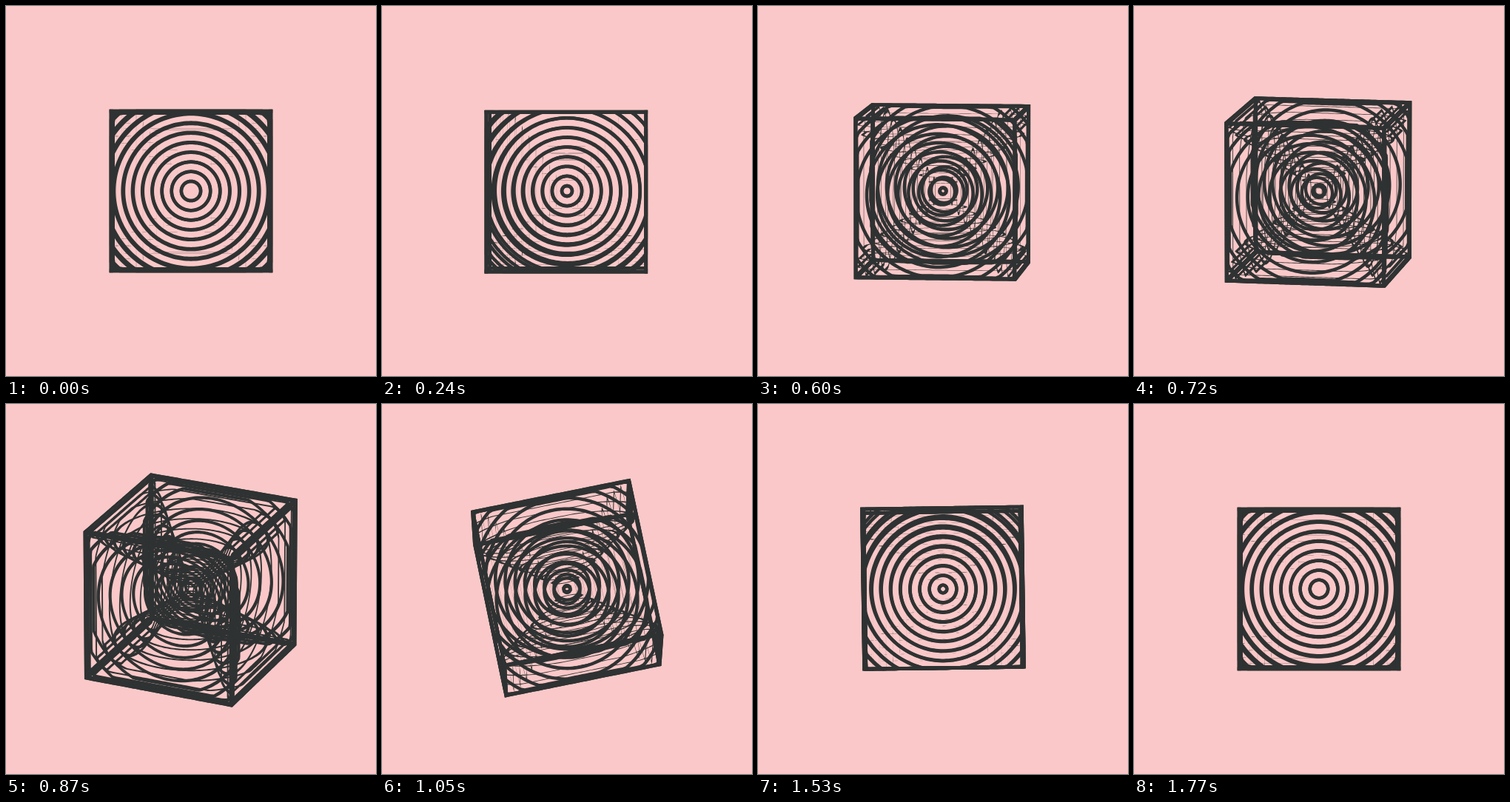
Animation of 500 by 500 pixels, one loop 1.8 s. Source, as an HTML page with a canvas:

```html
<!DOCTYPE html>
<html lang="en">
<head>
<meta charset="utf-8">
<title>Ringed cube</title>
<style>
  html, body { margin: 0; width: 100%; height: 100%; overflow: hidden; background: #fac8c8; }
  canvas { display: block; width: 500px; height: 500px; }
</style>
</head>
<body>
<canvas id="stage" width="500" height="500"></canvas>
<script>
const ctx = document.getElementById('stage').getContext('2d');
const LOOP = 1800, STEP = 30, RING_TIME = 450;
const HALF = 109, LINE = 4.5;  // cube half size and line width
const GAP = 13.1;              // ring spacing
const EYE = 9000, POINTS = 192;

// Closed form of cubic-bezier(1, 0, 0, 1)
function ease(x) {
  const s = 0.5 + Math.cbrt((x - 0.5) / 4);
  return s * s * (3 - 2 * s);
}

// Projected cube axes: screen x, screen y, nearness
function axesAt(angle) {
  const c = Math.cos(angle), s = Math.sin(angle);
  return [[c, s * s, c * s], [0, c, -s], [s, -s * c, -c * c]];
}

// Returns a projector for the plane at distance d along axis n
function plane(axes, n, d) {
  const w = axes[n], u = axes[(n + 1) % 3], v = axes[(n + 2) % 3];
  return (a, b) => {
    const p = i => u[i] * a + v[i] * b + w[i] * d;
    const scale = EYE / (EYE - p(2));
    return [250 + p(0) * scale, 250 + p(1) * scale];
  };
}

// Outline of a circle of radius r, flattened where it meets a square of half size h
function addOutline(project, r, h) {
  for (let i = 0; i < POINTS; i++) {
    const a = i / POINTS * Math.PI * 2, c = Math.cos(a), s = Math.sin(a);
    const reach = Math.min(r, h / Math.max(Math.abs(c), Math.abs(s)));
    const [x, y] = project(reach * c, reach * s);
    if (i) ctx.lineTo(x, y); else ctx.moveTo(x, y);
  }
  ctx.closePath();
}

function ring(project, r) {
  ctx.beginPath();
  addOutline(project, r + LINE / 2, HALF);
  if (r > LINE / 2) addOutline(project, r - LINE / 2, HALF - LINE);
  ctx.fill('evenodd');
}

function draw(t) {
  const axes = axesAt(ease(t / LOOP) * Math.PI / 2);
  const phase = t / RING_TIME % 1;
  ctx.fillStyle = '#fac8c8';
  ctx.fillRect(0, 0, 500, 500);
  ctx.fillStyle = '#2f3232';
  for (let n = 0; n < 3; n++) {
    for (const side of [-1, 1]) {
      for (let k = 0; k < 12; k++) {
        const r = (k + phase) * GAP, depth = r / Math.SQRT2;
        if (r > 0.1 && depth < HALF - LINE / 2) ring(plane(axes, n, side * depth), r);
      }
      // Square faces of the edge beams
      for (const depth of [HALF, HALF - LINE]) ring(plane(axes, n, side * depth), 2 * HALF);
    }
  }
}

const start = performance.now();
function tick() {
  const t = (performance.now() - start) % LOOP;
  draw(Math.floor(t / STEP) * STEP);
  requestAnimationFrame(tick);
}
tick();
</script>
</body>
</html>
```
